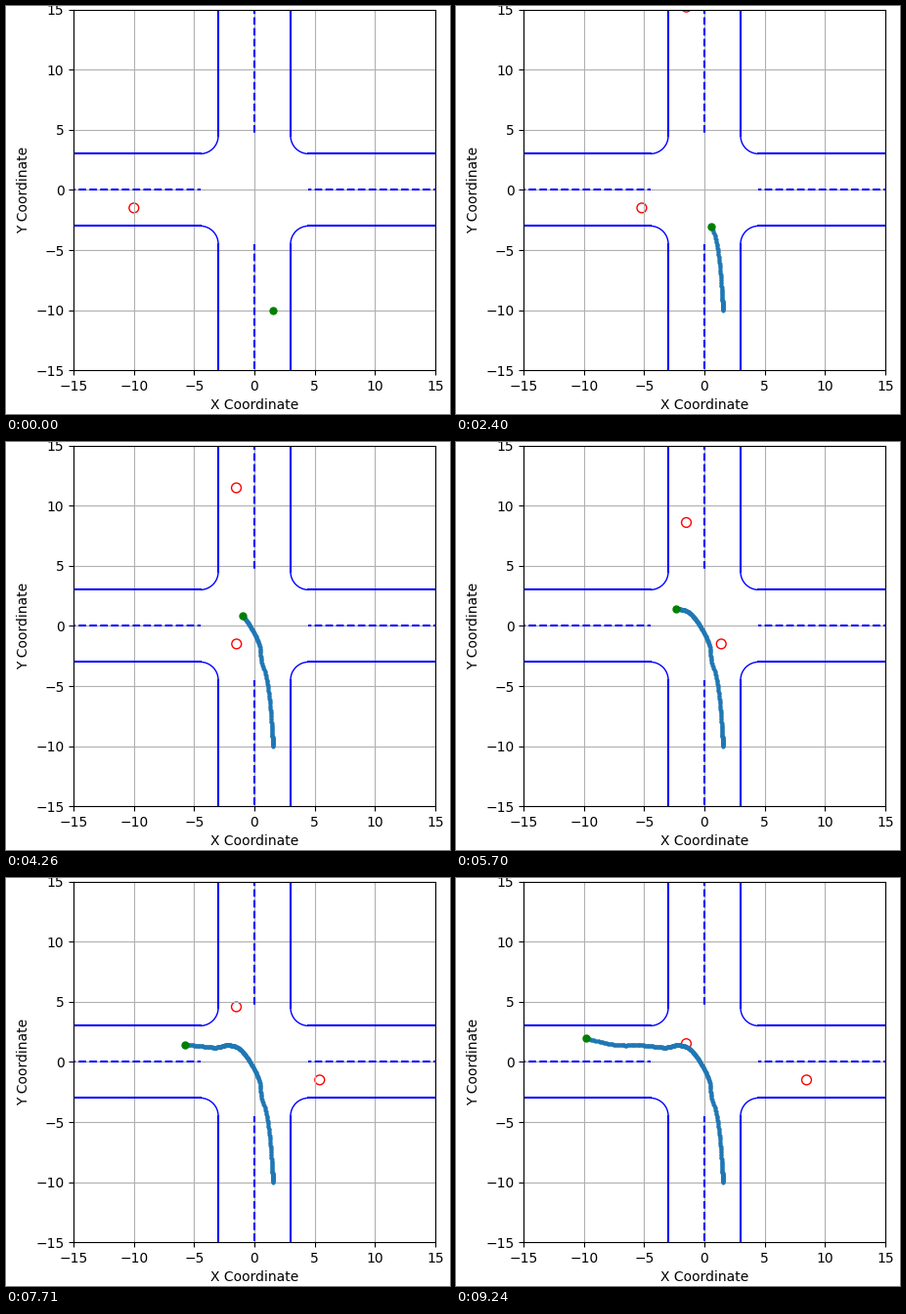
These frames come from a looping animation (454x418 px, 9.27 s). A matplotlib script:

```python
import numpy as np
import matplotlib.pyplot as plt
from matplotlib.animation import FuncAnimation
from matplotlib.patches import Arc, Circle

W, H, DPI = 454, 418, 100
FRAMES, INTERVAL = 309, 30
SIDE, LEFT, BOTTOM = 369.6, 69.1999, 44.8
LANE, EDGE, FAR = 3, 4.5, 20
STEP = 0.06  # obstacle travel per frame

# Ego vehicle position at evenly spaced times
KEY_GAP = 31
KEY_X = np.array([1.52, 1.47, 1.14, 0.43, -0.47, -1.33, -2.25, -3.26, -5.13, -7.39, -10])
KEY_Y = np.array([-10, -8.77, -5.18, -1.7, 0.15, 1.15, 1.39, 1.2, 1.38, 1.42, 2])


def smooth(u, vals):
    """Cubic curve through evenly spaced values."""
    slope = np.gradient(vals)
    i = np.clip(u.astype(int), 0, len(vals) - 2)
    f = u - i
    return ((1 + 2 * f) * (1 - f) ** 2 * vals[i] + f * (1 - f) ** 2 * slope[i]
            + f ** 2 * (3 - 2 * f) * vals[i + 1] + f ** 2 * (f - 1) * slope[i + 1])


t = np.arange(FRAMES)
swerve = 0.17 * np.exp(-((t - 81) / 6) ** 2)
path_x = smooth(t / KEY_GAP, KEY_X) - swerve
path_y = smooth(t / KEY_GAP, KEY_Y)

# The tiny margin guards against truncation to one pixel less
fig = plt.figure(figsize=((W + 1e-6) / DPI, (H + 1e-6) / DPI), dpi=DPI)
ax = fig.add_axes([LEFT / W, BOTTOM / H, SIDE / W, SIDE / H])
ax.set(xlim=(-15, 15), ylim=(-15, 15),
       xticks=range(-15, 16, 5), yticks=range(-15, 16, 5),
       xlabel="X Coordinate", ylabel="Y Coordinate")
ax.grid(True)


def road(xs, ys, style="-"):
    ax.plot(xs, ys, color="b", linestyle=style, linewidth=1.5)


def dashes(skip):
    """Default dash pattern, entered skip pixels late."""
    return skip * 72 / DPI / 1.5, (3.7, 1.6)


corners = [(-1, -1), (1, -1), (1, 1), (-1, 1)]
for k, (sx, sy) in enumerate(corners):
    road([sx * FAR, sx * EDGE], [sy * LANE] * 2)
    road([sx * LANE] * 2, [sy * FAR, sy * EDGE])
    ax.add_patch(Arc((sx * EDGE, sy * EDGE), 3, 3, theta1=90 * k,
                     theta2=90 * k + 90, color="b", linewidth=1))

# Centre lines run inward from beyond the view
road([-FAR, -EDGE], [0, 0], dashes(0))
road([FAR, EDGE], [0, 0], dashes(45))
road([0, 0], [FAR, EDGE], dashes(53.7))
road([0, 0], [-FAR, -EDGE], dashes(8))

cars = [ax.add_patch(Circle((0, 0), 0.4, fill=False, edgecolor="r",
                            linewidth=1)) for _ in range(2)]
trail, = ax.plot([], [], ".-", color="C0", markersize=4, zorder=3)
ego, = ax.plot([], [], "go", markersize=5, zorder=4)


def update(i):
    cars[0].center = (-10 + STEP * i, -1.5)
    cars[1].center = (-1.5, FAR - STEP * i)
    trail.set_data(path_x[:i + 1], path_y[:i + 1])
    ego.set_data([path_x[i]], [path_y[i]])
    return [*cars, trail, ego]


anim = FuncAnimation(fig, update, frames=FRAMES, interval=INTERVAL,
                     repeat=True, repeat_delay=0)
plt.show()
```
